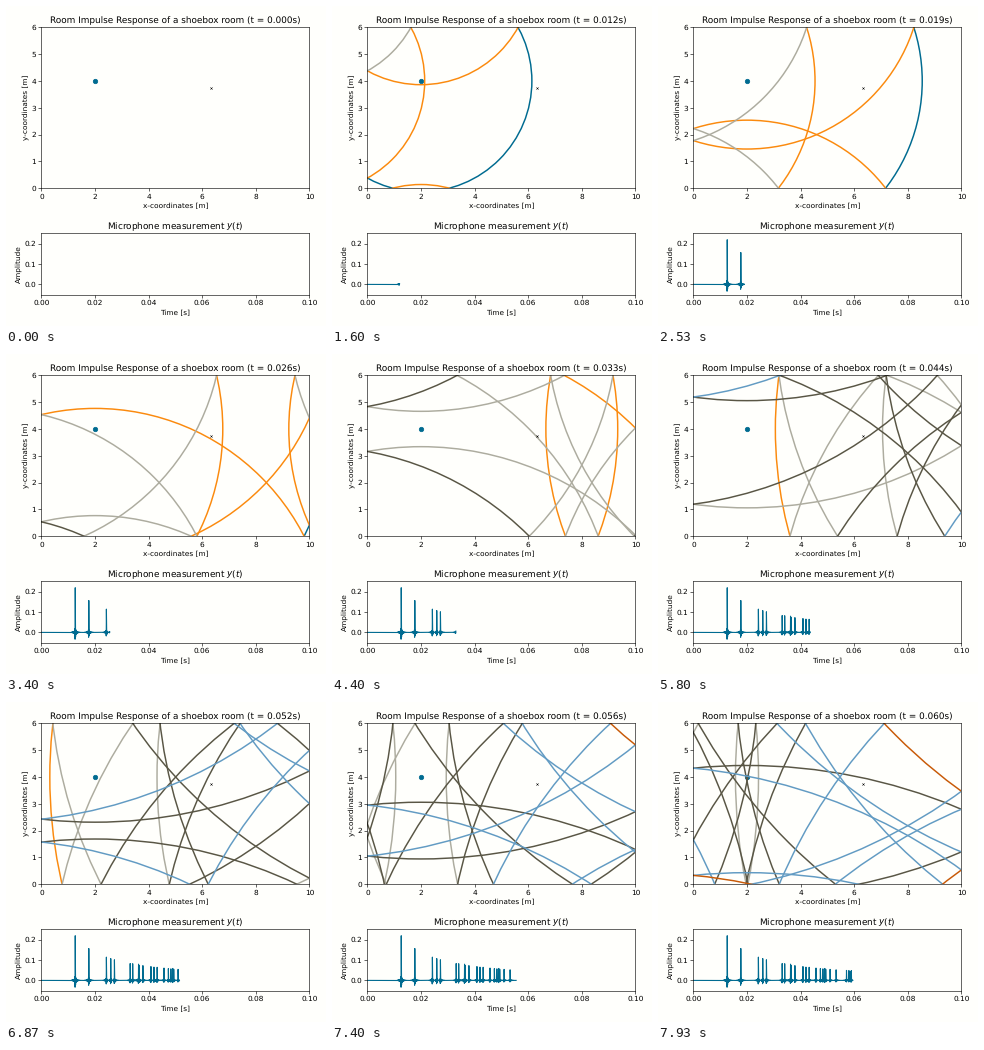
A matplotlib script for the animation above (8 s loop, 320x320 px).

```python
import itertools

import matplotlib.pyplot as plt
import numpy as np
from matplotlib.animation import FuncAnimation
from matplotlib.patches import Circle

SIZE = 320
STEPS = 120              # states of the picture in one loop
LOOP_MS = 8000
SPEED = 343.0            # m/s
RATE = 16000             # samples per second
SAMPLES_PER_STEP = 8
ROOM = (10.0, 6.0)
SOURCE = (2.0, 4.0)
MIC = (6.32, 3.75)
MAX_ORDER = 5
COLORS = ["#006b90", "#fb8a0e", "#adac9f", "#595645", "#629bc3", "#c85a08"]
PAPER = "#fffffc"


def mirror(pos, length):
    """Mirrored coordinates along one axis with their reflection counts."""
    for n in range(-3, 4):
        yield 2 * n * length + pos, abs(2 * n)
        yield 2 * n * length - pos, abs(2 * n - 1)


def image_sources():
    pairs = itertools.product(mirror(SOURCE[0], ROOM[0]),
                              mirror(SOURCE[1], ROOM[1]))
    found = [(x, y, a + b) for (x, a), (y, b) in pairs if a + b <= MAX_ORDER]
    return sorted(found, key=lambda s: s[2])


def impulse_response(images):
    """Sum of windowed sinc pulses, one for each image source."""
    taps = np.arange(-40, 41)
    pulse = np.hanning(81) * np.sinc(taps - 0.18)
    signal = np.zeros(RATE)
    for x, y, _ in images:
        dist = np.hypot(x - MIC[0], y - MIC[1])
        mid = int(round(dist / SPEED * RATE))
        signal[mid + taps] += pulse / dist
    return signal


def add_axes(fig, top, bottom):
    left, right = 35.4, 303.4
    return fig.add_axes([left / SIZE, 1 - bottom / SIZE,
                         (right - left) / SIZE, (bottom - top) / SIZE],
                        facecolor=PAPER)


images = image_sources()
signal = impulse_response(images)
clock = np.arange(len(signal)) / RATE

plt.rcParams["font.family"] = "DejaVu Sans"
plt.rcParams["text.hinting"] = "no_hinting"
fig = plt.figure(figsize=(6, 6), dpi=SIZE / 6, facecolor=PAPER)

room = add_axes(fig, 21.4, 182.2)
room.set(xlim=(0, ROOM[0]), ylim=(0, ROOM[1]),
         xlabel="x-coordinates [m]", ylabel="y-coordinates [m]")
room.set_yticks(range(7))
title = room.set_title("")
room.plot(*SOURCE, "o", color=COLORS[0], zorder=1)
room.plot(*MIC, "x", color="black", markersize=3, markeredgewidth=0.7)

waves = []
for x, y, order in images:
    wave = Circle((x, y), 0, fill=False, edgecolor=COLORS[order],
                  linewidth=2, zorder=1.5)
    waves.append(room.add_patch(wave))

plot = add_axes(fig, 227.4, 288.6)
plot.set(xlim=(0, 0.1), ylim=(-0.05, 0.25),
         xlabel="Time [s]", ylabel="Amplitude")
plot.set_yticks([0, 0.1, 0.2])
plot.set_title("Microphone measurement $y(t)$")
trace, = plot.plot([], [], color=COLORS[0], linewidth=1.5)


def draw(i):
    # Two frames per step, centred on the step's time.
    step = (i + 1) // 2 % STEPS
    count = step * SAMPLES_PER_STEP + 1
    t = count / RATE
    title.set_text(f"Room Impulse Response of a shoebox room (t = {t:.3f}s)")
    for wave in waves:
        wave.set_radius(SPEED * t)
    trace.set_data(clock[:count], signal[:count])
    return [title, trace, *waves]


anim = FuncAnimation(fig, draw, frames=2 * STEPS,
                     interval=LOOP_MS / (2 * STEPS),
                     repeat=True, repeat_delay=0, blit=False)
plt.show()
```
